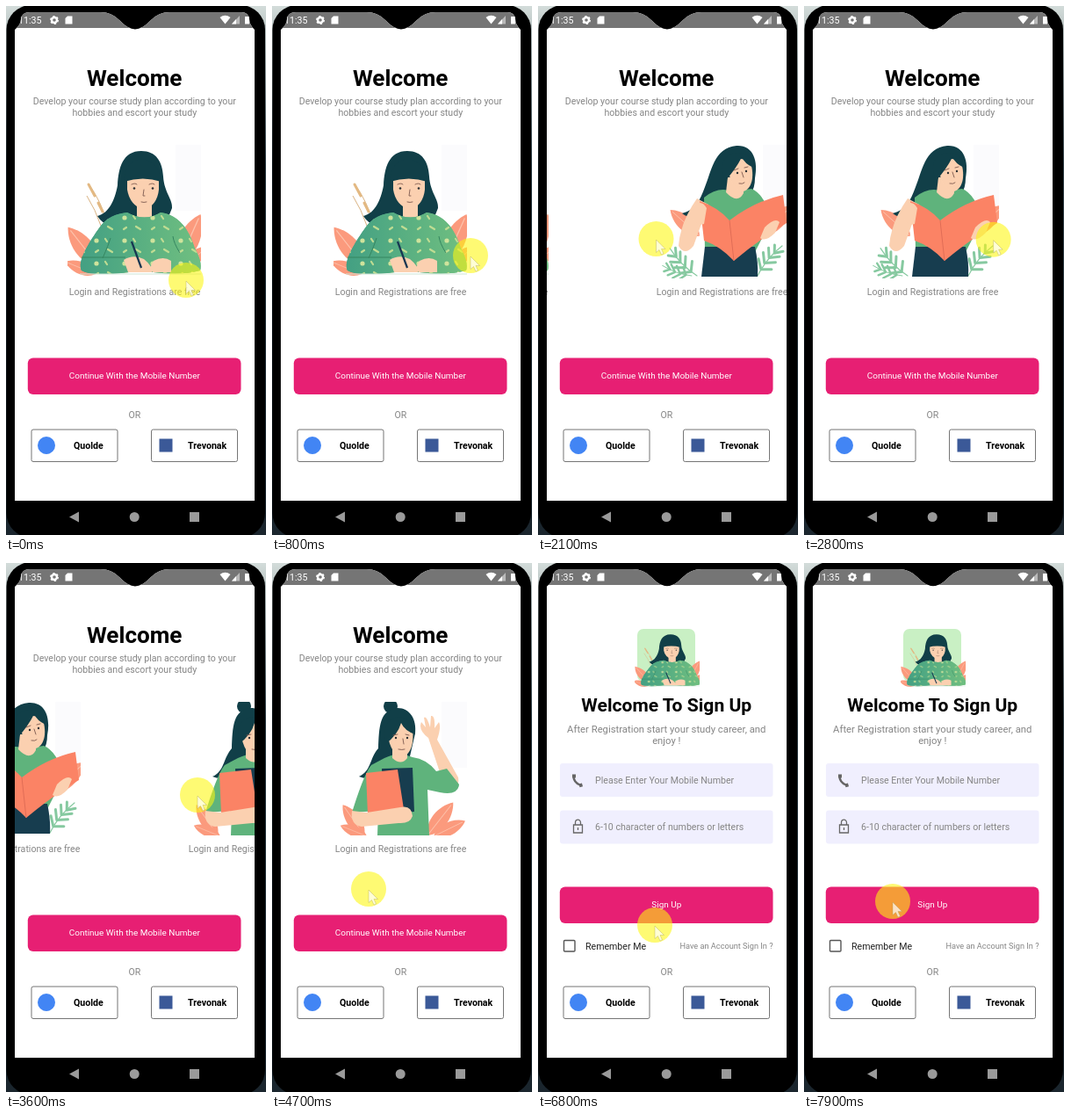
Write an HTML page that moves like this. It is 296 by 602 pixels and loops after 8 s.

```html
<!DOCTYPE html>
<html lang="en">
<head>
<meta charset="utf-8">
<title>Welcome carousel</title>
<style>
  html, body { margin: 0; width: 100%; height: 100%; overflow: hidden; background: #000; }
  svg { display: block; width: 296px; height: 602px; }
  text { font: 10.6px Roboto, sans-serif; fill: #858585; text-anchor: middle; }
  .left { text-anchor: start; }
  .title { font-size: 26.1px; font-weight: 700; fill: #000; }
  .heading { font-size: 21.1px; font-weight: 700; fill: #000; }
  .intro { font-size: 11.29px; }
  .action { font-size: 9.96px; fill: #fff; }
  .brand { font-weight: 700; fill: #000; text-anchor: start; }
  .small { font-size: 9.2px; text-anchor: end; }
  .button { fill: #e71f73; }
  .outline { fill: #fff; stroke: #666; stroke-width: .9; }
  .field { fill: #f0effe; }
  .panel { fill: #fbfbfd; }
  .hair { fill: #113f48; }
  .skin { fill: #fbd0b0; }
  .green { fill: #5fb37c; }
  .orange { fill: #fb8365; }
  .navy { fill: #173d4f; }
  .features { fill: none; stroke: #7d5a50; stroke-width: .9; stroke-linecap: round; }
  .eye { fill: #2c3034; }
</style>
</head>
<body>
<svg viewBox="0 0 296 602">
  <defs>
    <linearGradient id="desk" x2="0" y2="1">
      <stop stop-color="#d3dcda"/><stop offset=".3" stop-color="#33434b"/><stop offset="1" stop-color="#1a252d"/>
    </linearGradient>
    <linearGradient id="knit">
      <stop stop-color="#43a083"/><stop offset="1" stop-color="#70bf80"/>
    </linearGradient>
    <pattern id="dots" width="32" height="26" patternUnits="userSpaceOnUse">
      <circle cx="7" cy="7" r="2.6" fill="#cfe39c"/>
      <path d="M20 17l5 3M17 5l2 3M6 20l3-2" stroke="#bfdc92" stroke-width="2.2" stroke-linecap="round"/>
    </pattern>
    <clipPath id="screen">
      <path d="M10 27Q17 21 17 15Q18 7 27 7H108Q120 7 129 16Q139 26.500 147 26.500Q155 26.500 165 16Q174 7 186 7H268Q276 7 277 15Q277 21 283 27V563H10Z"/>
    </clipPath>
    <clipPath id="art"><rect x="70" y="158" width="152" height="152"/></clipPath>

    <g id="leaf">
      <path d="M0 0C-13-12-12-36 0-50C12-36 13-12 0 0Z" fill="#fb9a7d"/>
      <path d="M0 0V-46" stroke="#fdc3ac" stroke-width="1"/>
    </g>
    <g id="fern" fill="none" stroke="#86c9a0" stroke-linecap="round">
      <path d="M0 0Q-6-22-2-44" stroke-width="1.2"/>
      <path d="M-2-8l-10-7M-4-16l-9-8M-4-24l-8-8M-3-32l-6-7M-2-8l9-8M-4-16l9-9M-4-24l8-9M-3-32l6-8" stroke-width="3"/>
    </g>

    <g id="writer" clip-path="url(#art)">
      <path d="M115 246Q108 222 95 204M108 250Q102 232 92 216" fill="none" stroke="#d9b282" stroke-width="1"/>
      <path d="M94 203l7 13M105 224l5 10" stroke="#e3b983" stroke-width="3" stroke-linecap="round"/>
      <use href="#leaf" transform="translate(106 297) rotate(-38) scale(1.15)"/>
      <use href="#leaf" transform="translate(102 305) rotate(-68) scale(.75)"/>
      <use href="#leaf" transform="translate(196 294) rotate(24) scale(1.25)"/>
      <use href="#leaf" transform="translate(200 300) rotate(48) scale(.8)"/>
      <path class="hair" d="M154 165C171 165 178 177 179 194C180 212 190 220 189 230L181 250H118Q109 247 104 239C117 236 124 221 127 204C128 184 133 165 154 165Z"/>
      <path class="skin" d="M149 222H166V240Q158 246 149 240Z"/>
      <path class="skin" d="M138 192H174V209Q172 227 157 232Q141 227 138 209Z"/>
      <path class="hair" d="M134 200Q136 175 155 174Q174 177 177 200Q156 193 134 200Z"/>
      <path class="features" d="M143 203q4-2 6 0M163 203q4-2 6 0M157 209l-1 7h2M154 223q3 1 6 0"/>
      <circle class="eye" cx="146" cy="207.500" r="1.300"/><circle class="eye" cx="167" cy="207.500" r="1.300"/>
      <path id="sweater" d="M138 235Q158 246 176 235C199 238 209 257 215 276Q224 292 221 301Q200 307 168 303H140Q96 308 86 301C80 290 98 264 108 250Q118 237 138 235Z" fill="url(#knit)"/>
      <use href="#sweater" style="fill:url(#dots)"/>
      <path d="M138 235Q158 246 176 235C199 238 209 257 215 276Q224 292 221 301Q200 307 168 303H140Q96 308 86 301C80 290 98 264 108 250Q118 237 138 235Z" fill="url(#dots)"/>
      <path d="M110 287Q117 271 119 264M198 281Q191 270 190 262M86 286H136" fill="none" stroke="#358660" stroke-width="1"/>
      <path class="skin" d="M134 289Q145 282 157 288Q168 297 166 303H139ZM168 290Q179 284 188 290V303H167Q162 298 168 290Z"/>
      <path d="M143 268L154 298" stroke="#173651" stroke-width="2.200"/>
      <path d="M84 305H222" stroke="#cfe5d6" stroke-width="1"/>
    </g>

    <g id="reader" clip-path="url(#art)">
      <use href="#fern" transform="translate(118 307) rotate(-42)"/>
      <use href="#fern" transform="translate(112 307) rotate(-68) scale(.8)"/>
      <use href="#fern" transform="translate(187 307) rotate(42)"/>
      <use href="#leaf" transform="translate(121 262) rotate(-48) scale(.9)"/>
      <use href="#leaf" transform="translate(188 262) rotate(48) scale(1.05)"/>
      <path class="hair" d="M163 159C182 158 188 176 184 196Q184 207 179 214L135 236Q113 246 101 236C116 232 121 222 127 206C134 190 137 161 163 159Z"/>
      <path class="green" d="M126 218Q142 205 158 211L180 208Q195 214 203 243L184 280H127Z"/>
      <path class="skin" d="M153 195H171V213Q164 226 151 212Z"/>
      <path class="skin" d="M152 180Q166 169 179 178C184 195 180 208 171 211Q156 208 152 180Z"/>
      <path class="hair" d="M150 199C142 178 151 167 165 167Q180 167 182 184Q172 179 169 172Q162 186 150 199Z"/>
      <path class="features" d="M160 187l5-2M172 184l4-1M169 189l2 6M166 202q4 1 6-1"/>
      <circle class="eye" cx="164" cy="190" r="1.200"/><circle class="eye" cx="174" cy="188" r="1.200"/>
      <path class="navy" d="M127 274H184Q188 292 187 308H123Z"/>
      <path class="skin" d="M131 226L114 273Q104 285 97 273Q99 246 118 219Z"/>
      <path class="orange" d="M121 222Q142 229 155 244Q184 222 216 215L220 247Q190 265 160 290Q144 273 126 267Z"/>
      <path d="M155 244L160 290" stroke="#e06d56" stroke-width="1"/>
      <path class="skin" d="M114 228Q123 219 129 230L126 248Q117 251 114 241ZM195 252Q207 240 212 246L207 258Q196 269 190 264Z"/>
    </g>

    <g id="waver" clip-path="url(#art)">
      <use href="#leaf" transform="translate(105 310) rotate(-35) scale(.85)"/>
      <use href="#leaf" transform="translate(108 311) rotate(-68) scale(.65)"/>
      <use href="#leaf" transform="translate(177 310) rotate(38) scale(.95)"/>
      <use href="#leaf" transform="translate(184 311) rotate(64) scale(.8)"/>
      <circle class="hair" cx="135" cy="163" r="8"/>
      <path class="hair" d="M143 165C157 165 165 178 163 194L157 220L128 238Q112 249 99 243C113 237 111 222 121 211C122 187 122 167 143 165Z"/>
      <path class="skin" d="M190 235L178 199Q166 190 170 181L175 187L173 176Q176 173 180 187L181 174Q186 173 185 188L190 181Q193 186 188 201L212 244Q214 256 202 261Z"/>
      <path class="green" d="M128 222Q144 214 160 221Q176 223 187 237L199 234L213 252Q212 265 191 261L177 258L179 310H120L121 282L91 284Q105 239 113 230Z"/>
      <path class="skin" d="M137 210H154V222Q147 231 137 222Z"/>
      <path class="skin" d="M131 186Q148 175 160 188C162 208 157 218 148 221Q132 216 131 186Z"/>
      <path class="hair" d="M129 206Q124 178 144 175Q160 176 163 195Q151 191 147 182Q143 196 129 206Z"/>
      <path class="features" d="M138 196l5-1M152 195l4 1M149 200l1 6M144 212q4 1 7 0"/>
      <circle class="eye" cx="141" cy="199" r="1.200"/><circle class="eye" cx="154" cy="199" r="1.200"/>
      <path class="navy" d="M125 234L160 233L162 283L128 285Z"/>
      <path class="orange" d="M107 239L143 235L150 280L109 286Z"/>
      <path class="skin" d="M91 282L108 284L146 278Q159 275 160 288Q157 297 144 296L102 300Q89 298 91 282Z"/>
    </g>

    <g id="caption">
      <rect class="panel" x="193" y="158" width="29" height="75"/>
      <text x="146.500" y="329">Login and Registrations are free</text>
    </g>
  </defs>

  <rect width="296" height="602" fill="url(#desk)"/>
  <rect x=".5" y="-1" width="294.500" height="606" rx="28"/>

  <g clip-path="url(#screen)">
    <rect x="10" y="7" width="273" height="556" fill="#fff"/>

    <g id="welcome">
      <text class="title" x="146.200" y="91">Welcome</text>
      <text x="146.300" y="112.300">Develop your course study plan according to your</text>
      <text x="146.300" y="124.800">hobbies and escort your study</text>
      <g id="slides">
        <g><use href="#caption"/><use href="#writer"/></g>
        <g transform="translate(273)"><use href="#caption"/><use href="#reader"/></g>
        <g transform="translate(546)"><use href="#caption"/><use href="#waver"/></g>
      </g>
      <g id="continue">
        <rect class="button" x="24.800" y="400.500" width="242.700" height="41.500" rx="6"/>
        <text class="action" x="146.300" y="423.800">Continue With the Mobile Number</text>
      </g>
    </g>

    <g id="signup">
      <rect x="10" y="25" width="273" height="538" fill="#fff"/>
      <rect x="113" y="75" width="66" height="60" rx="7" fill="#c9f0c4"/>
      <use href="#writer" transform="matrix(.487 0 0 .42 76 12)"/>
      <text class="heading" x="146.300" y="169">Welcome To Sign Up</text>
      <text class="intro" x="146.300" y="192.700">After Registration start your study career, and</text>
      <text class="intro" x="146.300" y="206">enjoy !</text>
      <rect class="field" x="25" y="228" width="242.500" height="38" rx="3"/>
      <rect class="field" x="25" y="281.500" width="242.500" height="38" rx="3"/>
      <path d="M40.500 241.500Q40 249.500 48.500 253" fill="none" stroke="#666" stroke-width="2.400"/>
      <path d="M41 240.500v4M47 253.300l3.500-1" stroke="#666" stroke-width="4"/>
      <path d="M40.500 298h10v9h-10zM42.500 298v-2.500a3 3.300 0 0 1 6 0v2.500M45.500 301v3" fill="none" stroke="#666" stroke-width="1.300"/>
      <text class="left" x="65" y="251">Please Enter Your Mobile Number</text>
      <text class="left" x="65" y="304.300">6-10 character of numbers or letters</text>
      <rect class="button" x="24.800" y="368.500" width="242.700" height="41.500" rx="6"/>
      <text class="action" x="146.300" y="392.300">Sign Up</text>
      <rect x="29.500" y="429.500" width="12.500" height="12.500" rx="1" fill="#fff" stroke="#555" stroke-width="1.400"/>
      <text class="left" x="54" y="439.700" style="fill:#222">Remember Me</text>
      <text class="small" x="267.500" y="439">Have an Account Sign In ?</text>
    </g>

    <text x="146.500" y="468.700">OR</text>
    <rect class="outline" x="29" y="482" width="98" height="36.500" rx="2"/>
    <rect class="outline" x="165.500" y="482" width="98" height="36.500" rx="2"/>
    <circle cx="46" cy="500" r="10" fill="#4285f4"/>
    <rect x="174.500" y="492.500" width="15" height="15" fill="#3b5998"/>
    <text class="brand" x="77" y="504">Quolde</text>
    <text class="brand" x="207" y="504">Trevonak</text>

    <rect x="10" y="7" width="273" height="18" fill="#757575"/>
    <g fill="#fff">
      <text class="left" x="14" y="20" style="fill:#fff">11:35</text>
      <circle cx="55" cy="16" r="3" fill="none" stroke="#fff" stroke-width="2.400"/>
      <circle cx="55" cy="16" r="4.300" fill="none" stroke="#fff" stroke-width="1.400" stroke-dasharray="2.250"/>
      <path d="M70 11.500h5.500v9h-8v-6.500z"/>
      <path d="M243.500 13Q249.500 8.500 255.500 13L249.500 20.500Z"/>
      <path d="M266 11v9.500h-9z" opacity=".5"/>
      <path d="M262 15v5.500h-5z"/>
      <path d="M272 12h5v8.500h-5z"/>
    </g>
  </g>

  <g fill="#9a9a9a">
    <path d="M72 581.500L83 575.500V587.500Z"/>
    <circle cx="146.200" cy="581.500" r="5.500"/>
    <rect x="209" y="576" width="11" height="11"/>
  </g>

  <circle id="ring" fill="none" stroke="#8f9c22" stroke-width="2"/>
  <g id="pointer">
    <circle r="20" fill="#fdf60e" fill-opacity=".58"/>
    <path d="M0 1V15.500L3.500 12.500L6 18L8.500 17L6 11.500H10.500Z" fill="#fff" fill-opacity=".7" stroke="#a59a55" stroke-opacity=".5" stroke-width=".7"/>
  </g>
</svg>
<script>
  const LOOP = 8000, STEP = 100;
  const byId = id => document.getElementById(id);
  const move = (id, x, y) => byId(id).setAttribute('transform', `translate(${x} ${y})`);

  // Each key is [time, ...values]
  const pointerKeys = [
    [100, 205, 312], [1000, 232, 276], [1300, 225, 275], [1500, 138.5, 277.5], [1800, 137, 266],
    [2000, 137, 266], [2100, 134.5, 265], [3200, 262, 266], [3600, 218, 264], [3900, 140, 270],
    [4700, 110, 371], [5700, 133, 412], [7200, 133, 412], [7900, 101, 385]
  ];
  const slideKeys = [
    [1200, 0], [1500, -96], [1800, -180], [2000, -180], [2100, -210], [2300, -258], [2500, -273],
    [3300, -273], [3600, -410], [3800, -500], [4000, -540], [4100, -546]
  ];
  const pressKeys = [[5800, 1], [5950, .2], [6100, .2], [6300, 1]];
  const signupKeys = [[6200, 0], [6500, 1]];
  const clicks = [[1500, 184, 274], [3200, 262, 266], [5800, 133, 412]];

  function track(keys, time) {
    const next = keys.findIndex(key => key[0] > time);
    if (next === 0) return keys[0].slice(1);
    if (next < 0) return keys[keys.length - 1].slice(1);
    const [start, ...from] = keys[next - 1], [end, ...to] = keys[next];
    const part = (time - start) / (end - start);
    return from.map((value, i) => value + (to[i] - value) * part);
  }

  function drawRing(time) {
    const click = clicks.find(([start]) => time >= start && time < start + 300);
    const ring = byId('ring');
    ring.style.display = click ? '' : 'none';
    if (!click) return;
    const [start, x, y] = click;
    ring.setAttribute('r', 3.2 + (time - start) * .028);
    move('ring', x, y);
  }

  function draw() {
    const time = Math.floor(performance.now() % LOOP / STEP) * STEP;
    move('pointer', ...track(pointerKeys, time));
    move('slides', track(slideKeys, time)[0], 0);
    byId('continue').style.opacity = track(pressKeys, time)[0];
    byId('signup').style.opacity = track(signupKeys, time)[0];
    drawRing(time);
    requestAnimationFrame(draw);
  }
  draw();
</script>
</body>
</html>
```
